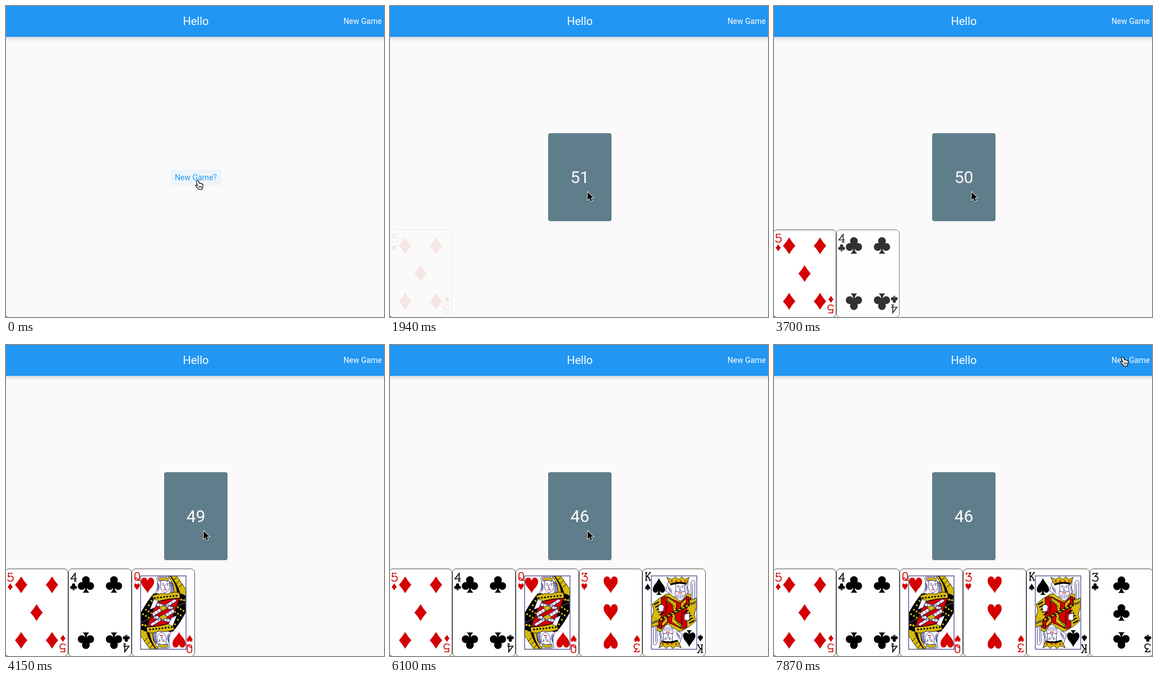
These frames come from a looping animation (674x555 px, 8 s). An HTML page with a canvas:

```html
<!DOCTYPE html>
<html lang="en">
<head>
<meta charset="utf-8">
<title>Card table</title>
<style>
html, body { margin: 0; width: 100%; height: 100%; overflow: hidden; background: #fafafa; }
canvas { display: block; }
</style>
</head>
<body>
<canvas id="stage" width="674" height="555"></canvas>
<script>
const LOOP = 8000;
const STEP = 147;
const RED = '#d40000', BLACK = '#000', GOLD = '#d6b90c', NAVY = '#14146e', WHITE = '#fff';
const ctx = document.getElementById('stage').getContext('2d');

// Suit symbols, centred on the origin
const suits = {
  diamond: { color: RED, small: 0.42, path: new Path2D('M0-15Q5-6.5 11 0Q5 6.5 0 15Q-5 6.5-11 0Q-5-6.5 0-15Z') },
  heart: { color: RED, small: 0.4, path: new Path2D('M0 15C-2 8-12.5 2-12.5-7C-12.5-13-9-15-6.5-15C-3-15-.8-12 0-8.5C.8-12 3-15 6.5-15C9-15 12.5-13 12.5-7C12.5 2 2 8 0 15Z') },
  spade: { color: BLACK, small: 0.4, path: new Path2D('M0-15C2-8 11-2 11 5C11 10 8 11 6 11C3.5 11 2 9.5 1 7Q1.5 13 5 15H-5Q-1.5 13-1 7C-2 9.5-3.5 11-6 11C-8 11-11 10-11 5C-11-2-2-8 0-15Z') },
  club: { color: BLACK, small: 0.42, path: clubPath() }
};

// Index letters as pen strokes
const ranks = {
  3: 'M-4-4.5V-7H4L-.5-1.5Q5-2 5 2.5Q5 7 0 7Q-4 7-5 4',
  4: 'M2.5 7V-7L-5 3H5.5M0 7H5',
  5: 'M4.5-7H-3.5V-1Q-1-2 1-2Q5-2 5 2.5Q5 7 0 7Q-4 7-5 4',
  Q: 'M-4-3Q-4-7 0-7Q4-7 4-3V3Q4 7 0 7Q-4 7-4 3ZM-4 4Q-1 1 1 5Q2.5 8 5 6',
  K: 'M-3-7V7M-5-7H-1M-5 7H-1M4-7L-3 2M-.5-1L4 7M2-7H5.5M2 7H5.5'
};

const hand = [
  { at: 1940, rank: '5', suit: 'diamond', pips: [[-27.5, -49.5], [27.5, -49.5]], centre: true },
  { at: 3270, rank: '4', suit: 'club', pips: [[-25, -50], [25, -50]] },
  { at: 3710, rank: 'Q', suit: 'heart', court: queen },
  { at: 4600, rank: '3', suit: 'heart', pips: [[0, -49.5]], centre: true },
  { at: 5350, rank: 'K', suit: 'spade', court: king },
  { at: 6550, rank: '3', suit: 'club', pips: [[0, -49.5]], centre: true }
];
const draws = [1940, 2680, 3710, 4450, 5350, 6100];
const fadeLevels = [0.08, 0.4, 0.8, 1];

function clubPath() {
  const p = new Path2D('M-3-4H3L1.2 5Q2 12 6 14.5H-6Q-2 12-1.2 5Z');
  for (const [x, y] of [[0, -8], [-7.6, 2.5], [7.6, 2.5]]) {
    p.moveTo(x + 6.9, y);
    p.arc(x, y, 6.9, 0, 7);
  }
  return p;
}

function shape(g, d, fill, line, width = 0.8) {
  const p = new Path2D(d);
  if (fill) { g.fillStyle = fill; g.fill(p); }
  if (line) { g.strokeStyle = line; g.lineWidth = width; g.stroke(p); }
}

function pip(g, suit, x, y, scale = 1) {
  g.save();
  g.translate(x, y);
  g.scale(scale, scale);
  g.fillStyle = suit.color;
  g.fill(suit.path);
  g.restore();
}

function dots(g, n, x, y, dx, dy, r, color) {
  g.fillStyle = color;
  for (let i = 0; i < n; i++) {
    g.beginPath();
    g.arc(x + dx * i, y + dy * i, r, 0, 7);
    g.fill();
  }
}

function lines(g, n, x, y, dx, dy, d, color, width) {
  for (let i = 0; i < n; i++) {
    g.save();
    g.translate(x + dx * i, y + dy * i);
    shape(g, d, null, color, width);
    g.restore();
  }
}

function face(g, x, y) {
  g.save();
  g.translate(x, y);
  shape(g, 'M-8-9Q0-13 8-9V2Q7 9 0 12Q-7 9-8 2Z', WHITE, NAVY);
  shape(g, 'M-6-4Q-4-6-1.5-4M2-4Q4.5-6 6.5-4M0-3L-1 3H1.5', null, NAVY, 0.9);
  dots(g, 2, -3.5, -2.2, 7.5, 0, 0.9, BLACK);
  shape(g, 'M-2.5 6H3', null, RED, 1.3);
  g.restore();
}

function queen(g) {
  shape(g, 'M9-65H24L40-42V-28L19-34Q17-50 9-65Z', GOLD, BLACK);
  shape(g, 'M14-65Q26-50 30-35L25-35Q22-52 12-65Z', BLACK);
  lines(g, 3, 18, -62, 5, 6, 'M0 5L6-1', BLACK, 1);
  shape(g, 'M-17-34Q-28-22-40 0V18L40-18V-30Q25-38 14-36Z', BLACK);
  for (let i = 0; i < 4; i++) dots(g, 3, -21 - i * 5, -21 + i * 8, 5, 3, 1.7, GOLD);
  dots(g, 3, 27, -24, 5, 1, 2, GOLD);
  shape(g, 'M-12-62Q-3-67 9-63Q19-52 19-35L8-33Q-6-30-14-36Q-7-43-12-62Z', WHITE, NAVY);
  lines(g, 4, 11, -56, 1.7, 1, 'M0 0Q4 10 1 20', NAVY, 0.9);
  lines(g, 3, -10, -54, 1, 2, 'M0 0Q2 8-2 13', NAVY, 0.8);
  face(g, 3, -47);
  shape(g, 'M-9-61Q0-65 9-60L8-55Q0-60-8-56Z', GOLD, NAVY);
  shape(g, 'M-20-30Q-4-36 8-33Q20-39 29-35L30-26Q4-25-15-18Z', GOLD, BLACK);
  dots(g, 8, -15, -26, 5.5, -0.6, 1.6, BLACK);
  shape(g, 'M-13-18Q7-25 28-25L25-12 2 0-24 12Z', RED, BLACK);
  shape(g, 'M-20 1L20-24 24-21-18 7ZM-14-18L18-10 15-5-16-13Z', WHITE, NAVY);
  lines(g, 7, -16, 0, 5, -3.1, 'M0 0L3 4', NAVY, 0.9);
  lines(g, 6, -11, -16, 5, 1.3, 'M0-1L-1 4', NAVY, 0.8);
  shape(g, 'M-17-24L-9-21-15-9-24-5Z', WHITE, NAVY);
  shape(g, 'M-8-9L1-13 8-8-1-3Z', GOLD, BLACK);
  shape(g, 'M-28 12L-13 5-9 8-25 16Z', GOLD, BLACK);
  pip(g, suits.heart, -28, -48.5, 0.93);
}

function king(g) {
  shape(g, 'M-14-33Q-28-25-39-15L-36-3-40 10V18L40-18 37-25Q29-35 23-34Z', GOLD, BLACK);
  shape(g, 'M-23-26L-15-30-13 6-23 11ZM22-30L30-26 27-12 21-9Z', RED, BLACK);
  lines(g, 5, -36, -14, 2.5, 4.6, 'M0 0L9-5', BLACK, 2.2);
  lines(g, 3, 25, -24, 3.5, 2, 'M0 0L4 7', BLACK, 1.8);
  shape(g, 'M-9-58L-15-39Q-6-33-2-29Q13-22 22-33Q30-38 24-43L25-57Z', WHITE, NAVY);
  lines(g, 4, -9, -48, 1.7, 2.2, 'M0 0Q-3 5 1 8', NAVY, 0.8);
  lines(g, 3, 20, -48, 0.7, 4, 'M0 0Q5 1 3 5', NAVY, 0.8);
  face(g, 11, -43);
  shape(g, 'M2-38Q7-36 11-38Q16-36 20-38Q22-25 11-21Q0-25 2-38Z', WHITE, NAVY);
  lines(g, 5, 5, -33, 3, 0, 'M0 0Q1 5 0 8', NAVY, 0.7);
  shape(g, 'M8-35H14', null, RED, 1.3);
  shape(g, 'M-13-63L-4-59 2-64 8-59 14-64 19-59 27-63 22-50Q9-54-6-49Z', GOLD, BLACK);
  shape(g, 'M-6-52Q8-57 22-53V-50Q8-54-6-49Z', BLACK);
  dots(g, 4, -4, -56, 8, 0, 1.4, RED);
  shape(g, 'M-13-29L3-21 11-18 22-28 20-9-14 7Z', RED, BLACK);
  shape(g, 'M-12-27L4-17 4-4-1-2-3-14-13-21ZM21-25L12-16V-5L16-7 17-14 22-19Z', GOLD, BLACK);
  dots(g, 5, -10, -22, 3.2, 3.6, 1, BLACK);
  shape(g, 'M-25 10L26-16 29-10-22 17Z', BLACK);
  lines(g, 7, -20, 10, 6.8, -3.5, 'M0 0L4-2', GOLD, 3);
  shape(g, 'M-28-12Q-22-17-18-11L-19-3-27-1Z', WHITE, NAVY);
  shape(g, 'M30-52Q33-61 37-56V-18L31-15Z', WHITE, NAVY);
  shape(g, 'M33-52V-20', null, NAVY, 0.7);
  shape(g, 'M27-22L40-26V-20L28-16Z', GOLD, BLACK);
  pip(g, suits.spade, -27, -46.5, 1);
}

function courtHalf(g, draw) {
  g.save();
  g.beginPath();
  g.moveTo(-40, -65);
  g.lineTo(40, -65);
  g.lineTo(40, -18);
  g.lineTo(-40, 18);
  g.clip();
  draw(g);
  g.restore();
}

function makeCard(card) {
  const sprite = document.createElement('canvas');
  sprite.width = 113;
  sprite.height = 157;
  const g = sprite.getContext('2d');
  const suit = suits[card.suit];
  g.translate(56.5, 78.5);
  g.beginPath();
  g.roundRect(-56, -78, 112, 156, 6.5);
  g.fillStyle = WHITE;
  g.fill();
  g.strokeStyle = '#555';
  g.lineWidth = 1;
  g.stroke();
  for (let side = 0; side < 2; side++) {
    g.save();
    g.translate(-46.7, card.court ? -64.5 : -63);
    shape(g, ranks[card.rank], null, suit.color, 1.7);
    g.restore();
    pip(g, suit, -47, -46, suit.small);
    if (card.court) courtHalf(g, card.court);
    else for (const [x, y] of card.pips) pip(g, suit, x, y);
    g.rotate(Math.PI);
  }
  if (card.centre) pip(g, suit, 0, 0);
  if (card.court) {
    g.strokeStyle = NAVY;
    g.lineWidth = 1;
    g.strokeRect(-40.5, -65.5, 81, 131);
  }
  return sprite;
}

function text(str, x, y, size, color, weight = 400) {
  ctx.font = `${weight} ${size}px Roboto, sans-serif`;
  ctx.textAlign = 'center';
  ctx.fillStyle = color;
  ctx.fillText(str, x, y);
}

function fade(t, start) {
  if (t < start) return 0;
  return fadeLevels[Math.min(3, Math.floor((t - start) / STEP))];
}

function table() {
  ctx.fillStyle = '#fafafa';
  ctx.fillRect(0, 0, 674, 555);
  const shade = ctx.createLinearGradient(0, 55, 0, 64);
  shade.addColorStop(0, 'rgba(0,0,0,.16)');
  shade.addColorStop(0.3, 'rgba(0,0,0,.07)');
  shade.addColorStop(1, 'rgba(0,0,0,0)');
  ctx.fillStyle = shade;
  ctx.fillRect(0, 55, 674, 9);
  ctx.fillStyle = '#2196f3';
  ctx.fillRect(0, 0, 674, 55);
  text('Hello', 338.5, 34, 20, WHITE);
  text('New Game', 636, 32, 14, WHITE);
  shape(ctx, 'M0 552Q.5 554.5 3 555H0Z', '#555');
}

function button() {
  ctx.fillStyle = '#eef5fa';
  ctx.beginPath();
  ctx.roundRect(293, 292, 91, 28, 2);
  ctx.fill();
  text('New Game?', 338.5, 310.5, 14, '#2196f3');
}

function deck(t, alpha) {
  ctx.globalAlpha = alpha;
  ctx.fillStyle = '#607d8b';
  ctx.beginPath();
  ctx.roundRect(282, 227, 113, 157, 4);
  ctx.fill();
  const left = 52 - draws.filter(at => t >= at).length;
  text(left, 338.5, 316, 30, WHITE);
  ctx.globalAlpha = 1;
}

function arrow(x, y) {
  ctx.save();
  ctx.translate(x, y);
  ctx.shadowColor = 'rgba(0,0,0,.35)';
  ctx.shadowBlur = 2;
  ctx.shadowOffsetY = 1;
  const d = 'M0 0V14.2L3.2 11.2 5.5 16.5 7.8 15.5 5.6 10.3H10Z';
  shape(ctx, d, WHITE, WHITE, 1.8);
  ctx.shadowColor = 'transparent';
  shape(ctx, d, BLACK);
  ctx.restore();
}

function pointer(x, y) {
  ctx.save();
  ctx.translate(x, y);
  shape(ctx, 'M4.5 1Q6 .5 6.8 2L8.2 6Q9.5 5.2 10.3 6.3Q11.6 5.6 12.3 6.9Q14 6.5 14.5 8Q15.3 11 14 13.5L13.2 17H6.5Q5 13.5 2.2 11.5Q.8 10 1.8 9Q3 8.4 5 10L3 3.5Q2.8 1.6 4.5 1Z', WHITE, BLACK, 1.2);
  lines(ctx, 3, 7.8, 10.5, 2.1, 0, 'M0 0V4', BLACK, 0.9);
  ctx.restore();
}

function cursor(t) {
  if (t < 600) pointer(336.5, 310.5);
  else if (t < 1340) arrow(341.5, 309.5);
  else if (t < 7430) arrow(352.5, 332);
  else if (t < 7577) arrow(522, 117);
  else if (t < 7723) arrow(553, 83);
  else if (t < 7870) arrow(610, 32);
  else pointer(616.8, 20.5);
}

function render(t) {
  table();
  if (t < 600) button();
  if (t >= 450) deck(t, t < 600 ? 0.25 : t < 750 ? 0.7 : 1);
  hand.forEach((card, i) => {
    ctx.globalAlpha = fade(t, card.at);
    ctx.drawImage(card.sprite, 113 * i - 2, 399);
  });
  ctx.globalAlpha = 1;
  cursor(t);
}

for (const card of hand) card.sprite = makeCard(card);
const start = performance.now();
function tick() {
  render((performance.now() - start) % LOOP);
  requestAnimationFrame(tick);
}
tick();
</script>
</body>
</html>
```
